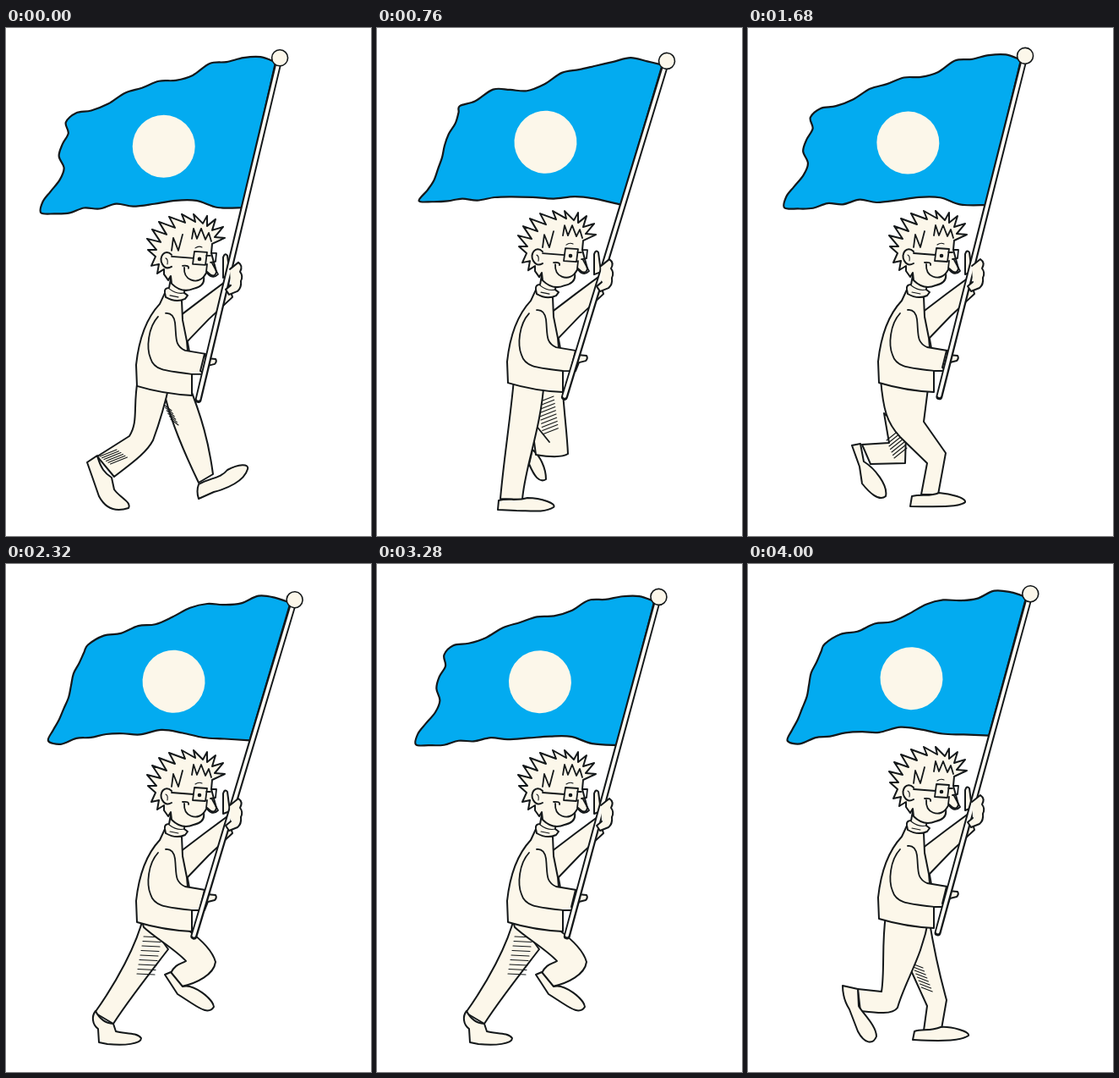
Recreate the animation shown at these times as an HTML page. Size 432 by 600 pixels, loop 4.04 s.

```html
<!DOCTYPE html>
<html lang="en">
<head>
<meta charset="utf-8">
<title>Flag bearer</title>
<style>
html, body { margin: 0; width: 100%; height: 100%; overflow: hidden; background: #fff; }
svg { display: block; width: 432px; height: 600px; }
path, circle { stroke-linecap: round; stroke-linejoin: round; }
.fill { fill: #fcf7ea; stroke: #14181a; stroke-width: 2; }
.line { fill: none; stroke: #14181a; stroke-width: 1.8; }
.thin { fill: none; stroke: #14181a; stroke-width: 1.1; }
</style>
</head>
<body>
<svg viewBox="0 0 432 600">
  <g id="legs"></g>
  <g id="banner">
    <path id="cloth" fill="#03abf0" stroke="#14181a" stroke-width="2.2"/>
    <circle cx="186" cy="140" r="37" fill="#fcf7ea"/>
  </g>
  <g id="body">
    <path class="fill" d="M206 340L235 318 262 298 268 318 240 344 212 373Z"/>
    <path class="fill" d="M189 311L182 326C166 343 157 370 154 398L155 423C175 429 198 433 220 434L220 405 215 381 214 370 209 345 208 322Z"/>
    <path class="line" d="M215 371L217 382"/>
    <path class="fill" d="M197 285L193 307Q187 307 188 313L189 318Q201 325 212 320L215 316 211 313 212 302Z"/>
    <path class="thin" d="M193 308Q202 315 211 313M194 316L204 318"/>
    <path class="fill" stroke="none" style="stroke:none" d="M190 337C175 341 166 372 171 389C175 405 186 405 221 409L235 409 236 386 212 381C198 374 203 366 200 348Q198 337 190 337Z"/>
    <path class="line" d="M180 341C168 354 166 378 171 390C175 404 187 405 221 409L232 409M236 385L212 381C199 375 202 366 200 348Q198 336 189 337M220 411V433"/>
    <path class="fill" d="M235 385L237 390 248 391Q250 394 247 397L239 399 235 409 230 405Z"/>
    <g id="head">
      <path class="fill" d="M195 293L192 298 187 291 187 285 179 290 181 279 172 281 177 270 168 262 178 262 167 249 183 253 173 238 190 244 181 229 200 236 193 223 212 230 208 220 224 229 222 220 233 231 238 222 238 234 248 226 244 239 257 235 247 247 259 248 244 255 243 266 249 288Q247 297 238 288L234 294Q236 305 222 308Q208 314 196 302Z"/>
      <path class="line" d="M196 263L198 248 204 263 209 244M220 249L222 237 226 249 231 237 236 250 240 242 243 252"/>
      <path class="fill" d="M196 268C188 260 180 271 185 279Q189 286 196 282"/>
      <path class="thin" d="M189 272Q192 273 191 279M224 260Q228 257 232 259"/>
      <path class="line" d="M196 270L222 272M223 264L238 265 236 280 221 279ZM237 269L242 269M243 266L249 266 248 276 242 277M209 281Q217 280 216 284M211 283C210 298 225 303 234 294M238 279L237 288Q244 298 251 291L244 278"/>
      <circle cx="229" cy="273" r="2.3" fill="#14181a"/>
    </g>
    <path class="fill" d="M257 295L257 271Q259 265 262 269L265 292Z"/>
  </g>
  <g id="pole">
    <path d="M321 42L228 439" fill="none" stroke="#14181a" stroke-width="8"/>
    <path d="M321 43L228 438" fill="none" stroke="#fffdf6" stroke-width="3.8"/>
    <circle class="fill" cx="323" cy="35" r="9.5" style="stroke-width:1.6"/>
  </g>
  <path id="fingers" class="fill" d="M265 285L275 277Q281 281 277 288Q281 293 278 299Q279 307 274 311L264 315 260 309 266 304"/>
</svg>
<script>
const LOOP = 4040, STEP = 40;
const byId = id => document.getElementById(id);
const clamp = (v, lo, hi) => Math.min(hi, Math.max(lo, v));

// Cloth edges sampled at fixed stations: top y, fly-side x, bottom y.
const topX = [318, 300, 280, 260, 240, 220, 200, 180, 160, 140, 120, 100, 82];
const sideY = [112, 125, 138, 152, 166, 180, 194, 206, 219];
const bottomX = [57, 75, 92, 110, 130, 150, 175, 200, 225, 250, 280];
const CLOTH_CYCLE = 42;
const clothKeys = [
  { at: 0, top: [40, 34, 35, 40, 42, 56, 62, 63, 71, 77, 90, 98, 101],
    side: [70, 73, 66, 62, 68, 63, 52, 43, 41],
    bottom: [220, 219, 213, 214, 208, 211, 208, 204, 204, 212, 212] },
  { at: 16, top: [39, 34, 33, 43, 46, 46, 52, 64, 74, 77, 87, 91, 103],
    side: [78, 73, 67, 65, 63, 58, 53, 47, 42],
    bottom: [222, 214, 212, 207, 205, 205, 198, 200, 204, 204, 204] },
  { at: 19, top: [40, 37, 34, 40, 46, 52, 57, 72, 81, 81, 82, 97, 104],
    side: [81, 78, 71, 67, 65, 61, 57, 50, 41],
    bottom: [219, 217, 213, 214, 209, 207, 206, 206, 202, 203, 208] },
  { at: 27, top: [42, 41, 41, 41, 41, 48, 60, 66, 68, 81, 91, 94, 97],
    side: [81, 77, 71, 75, 70, 66, 55, 48, 46],
    bottom: [215, 214, 211, 205, 207, 197, 198, 204, 200, 203, 209] }
];
clothKeys.push({ ...clothKeys[0], at: CLOTH_CYCLE });

function smooth(points) {
  let d = `M${points[0]}`;
  for (let i = 0; i < points.length - 1; i++) {
    const p = points[i], q = points[i + 1];
    const before = points[i - 1] || p, after = points[i + 2] || q;
    const c1 = p.map((v, k) => (v + (q[k] - before[k]) / 6).toFixed(1));
    const c2 = q.map((v, k) => (v - (after[k] - p[k]) / 6).toFixed(1));
    d += `C${c1} ${c2} ${q}`;
  }
  return d;
}

function clothPath(frame) {
  const phase = frame % CLOTH_CYCLE;
  const n = clothKeys.findIndex(key => key.at > phase);
  const a = clothKeys[n - 1], b = clothKeys[n];
  const mix = (phase - a.at) / (b.at - a.at);
  const edge = name => a[name].map((v, i) => v + (b[name][i] - v) * mix);
  const points = [
    ...edge('top').map((y, i) => [topX[i], y]),
    ...edge('side').map((x, i) => [x, sideY[i]]),
    ...edge('bottom').map((y, i) => [bottomX[i], y])
  ];
  return smooth(points) + 'L318 40Z';
}

const shape = d => `<path class="fill" d="${d}"/>`;
const limb = (leg, shoe) => shape(leg) + shape(shoe);
function hatch(x, y, count, dx, dy, w, h) {
  let d = '';
  for (let i = 0; i < count; i++) d += `M${x + i * dx} ${y + i * dy}l${w} ${h}`;
  return `<path class="thin" d="${d}"/>`;
}

const contact = {
  front: limb('M185 418C190 455 214 508 228 537L245 527C240 490 232 460 215 418Z',
    'M228 539C242 531 254 532 262 522C275 515 288 514 286 521C282 535 262 544 246 548L228 556Q225 547 228 539Z'),
  back: limb('M156 415C150 447 157 465 146 482L108 506 128 530C150 513 166 502 174 487C181 468 187 450 194 418Z',
    'M96 513L108 505C112 520 117 526 125 531L128 545C135 555 149 560 145 567C130 572 118 568 110 553L102 530Z')
};
const passing = {
  stand: limb('M162 415C158 460 150 510 146 556L172 557C175 518 194 475 198 415Z',
    'M144 558C155 555 165 559 178 555C195 555 213 562 209 566C198 573 180 570 165 570L143 569Z'),
  swing: limb('M184 498C193 505 200 520 200 533C192 538 186 529 180 515Z',
    'M192 418L219 418C222 460 225 480 226 503C218 508 200 506 188 504L183 466Z')
};
const push = {
  back: limb('M163 415C155 450 130 495 105 530L127 543C145 515 165 490 192 455Z',
    'M106 528C101 534 102 544 109 549L110 565 120 567C140 569 160 567 160 560C155 553 140 555 130 552L127 543Q113 542 106 528Z'),
  front: limb('M160 418L215 418 215 432C226 440 244 455 248 470C246 485 226 495 208 499L195 483C201 472 206 473 213 469C200 455 177 442 163 429Z',
    'M188 485L195 482 209 499C222 495 245 514 246 523C240 533 228 524 217 517L203 508Z')
};

const poses = [
  contact.front + hatch(187, 445, 6, 1.6, 3.4, 9, 7) + contact.back + hatch(111, 506, 6, 2.5, 1.8, 20, -8),
  limb('M188 440L192 478 212 522 208 551 229 549 235 515C228 490 220 455 214 418Z',
    'M197 552C206 549 216 552 228 547C240 546 263 552 261 557C250 565 215 563 195 562Z') +
    hatch(194, 472, 8, 1.6, 4, 13, 5) +
    limb('M163 415C158 450 162 480 158 505L130 502 133 528C150 530 171 533 177 524C186 492 206 465 214 418Z',
    'M112 498L130 502 131 522C135 530 152 545 152 558C148 568 138 567 130 552L120 526C113 515 112 505 112 498Z'),
  passing.stand + hatch(172, 435, 8, -.5, 6, 20, -5) + passing.swing,
  push.back + hatch(163, 440, 9, -1, 5.5, 21, 1) + push.front,
  contact.back + hatch(111, 506, 6, 2.5, 1.8, 20, -8) + contact.front,
  limb('M161 455L167 490 135 492 145 515 186 514 187 478Z',
    'M123 493L133 491 137 512C150 520 166 540 163 553C155 560 143 548 135 538L132 518Z') +
    hatch(164, 487, 7, 1.5, 3.5, 15, -12) +
    limb('M157 415C160 450 164 466 180 483L212 514 205 551 225 551 234 502 208 465 214 418Z',
    'M194 553C206 550 215 554 226 549C240 550 258 555 257 560C250 567 215 565 192 565Z'),
  passing.swing + hatch(191, 442, 10, .6, 4.2, 18, -7) +
    '<path class="line" d="M187 468L204 489"/>' + passing.stand,
  push.front + push.back
];

let shownPose = -1;
function draw(time) {
  const frame = Math.floor((time % LOOP) / STEP);
  const beat = Math.max(0, frame - 1);

  const pose = Math.floor(beat / 3) % poses.length;
  if (pose !== shownPose) {
    byId('legs').innerHTML = poses[pose];
    shownPose = pose;
  }

  const bob = clamp(2 - 3 * Math.cos(2 * Math.PI * (beat % 12 - 4.3) / 12), 0, 4) - 4;
  const sway = .0344 - .0309 * Math.cos(2 * Math.PI * frame / 36.5);
  const lift = `translate(0 ${bob})`;
  const swing = `translate(0 ${bob + sway * 37}) rotate(${sway * 180 / Math.PI} 250 345)`;
  byId('body').setAttribute('transform', lift);
  byId('fingers').setAttribute('transform', lift);
  byId('pole').setAttribute('transform', swing);
  byId('banner').setAttribute('transform', swing);
  byId('cloth').setAttribute('d', clothPath(frame));
}

const start = performance.now();
function tick() {
  draw(performance.now() - start);
  requestAnimationFrame(tick);
}
tick();
</script>
</body>
</html>
```
